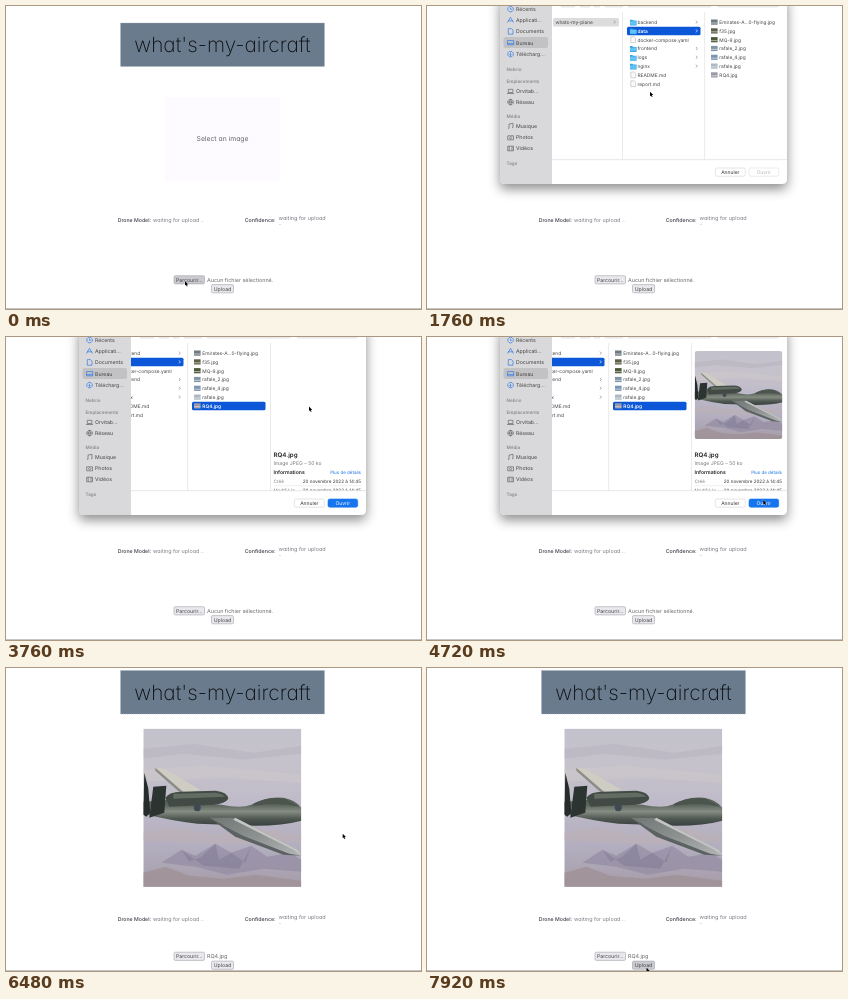
Recreate the animation shown at these times as an HTML page. Size 415x303 px, loop 8000 ms.

```html
<!DOCTYPE html>
<html lang="fr">
<head>
<meta charset="utf-8">
<title>what's-my-aircraft</title>
<style>
  html, body { margin: 0; width: 100%; height: 100%; overflow: hidden; background: #fff; }
  svg { display: block; width: 415px; height: 303px; }
  text { font-family: Inter, "Open Sans", sans-serif; white-space: pre; text-rendering: geometricPrecision; }
  .geo { font-feature-settings: "cv11"; }
  #dialog { filter: drop-shadow(0 5px 6px rgba(0, 0, 0, .45)); }
</style>
</head>
<body>
<svg id="stage" viewBox="0 0 415 303" xmlns="http://www.w3.org/2000/svg"></svg>
<script>
const LOOP = 8000;
const BLUE = '#0b57d8';

const text = (x, y, str, size, fill = '#444', extra = '') =>
  `<text x="${x}" y="${y}" font-size="${size}" fill="${fill}" ${extra}>${str}</text>`;
const rect = (x, y, w, h, fill, extra = '') =>
  `<rect x="${x}" y="${y}" width="${w}" height="${h}" fill="${fill}" ${extra}/>`;
const path = (d, fill, extra = '') => `<path d="${d}" fill="${fill}" ${extra}/>`;
const mid = 'text-anchor="middle"';
const end = 'text-anchor="end"';
const bold = 'font-weight="600"';
const line = (d, color = '#777') => path(d, 'none', `stroke="${color}" stroke-width=".7"`);
const stops = (...colors) => colors.map((c, i) =>
  `<stop offset="${i / (colors.length - 1)}" stop-color="${c}"/>`).join('');

// Aerial scene, 158 x 158
const scene = `
  <linearGradient id="haze" x2="0" y2="1">${stops('#c3c2cc', '#c6c2cb', '#bdb9c8', '#b2aebf', '#a69ca8')}</linearGradient>
  <linearGradient id="hull" x2="0" y2="1">${stops('#5a645a', '#59635a', '#858c82', '#4f5852', '#39413f')}</linearGradient>
  <linearGradient id="wing" x2="1" y2="1">${stops('#6f7674', '#8d9291', '#b4b6b6')}</linearGradient>
  <symbol id="scene" viewBox="0 0 158 158">
    ${rect(0, 0, 158, 158, 'url(#haze)')}
    ${path('M0 20L50 15 110 24 158 17V25L100 31 40 25 0 30Z', '#b8b4bf', 'opacity=".5"')}
    ${path('M0 41L60 37 158 46V54L80 49 0 53Z', '#cfc9cc', 'opacity=".5"')}
    ${path('M0 104L30 98 70 106 110 99 158 106V113L90 116 0 112Z', '#bcb1b6', 'opacity=".6"')}
    ${path('M18 134L38 121 52 127 72 115 88 124 108 117 124 128 146 124 158 131V143L120 140 84 146 52 138Z', '#8f87a0', 'opacity=".6"')}
    ${path('M0 144L22 138 46 147 80 150 112 146 158 152V158H0Z', '#9f9196', 'opacity=".8"')}
    ${path('M38 121L46 133 58 128 72 115 76 131 88 124 102 134 108 117 96 140 60 137Z', '#77708c', 'opacity=".4"')}
    ${path('M12 39L21 40 57 61 42 65Z', '#cfcdc3')}
    ${path('M12 39L42 65 38 65 12 42Z', '#8b8d86')}
    ${path('M0 73L26 71 78 76Q98 80 108 76 124 67 140 69 152 71 158 79V92Q140 97 112 97L54 95Q28 92 0 85Z', 'url(#hull)')}
    ${path('M22 69Q26 63 38 63L72 62Q84 63 85 70 82 75 70 76L26 78Z', '#414a44')}
    ${path('M30 65L72 64Q80 65 82 68L30 70Z', '#626c62')}
    ${path('M110 75Q126 67 142 70L156 78Q136 73 110 77Z', '#4b554e')}
    ${path('M66 89L92 89 154 121 159 127 146 125 100 107Z', 'url(#wing)')}
    ${path('M92 89L154 121 159 127 150 121 90 91Z', '#c4c5c3')}
    ${path('M66 89L100 107 146 125 158 127 140 126 92 108Z', '#5c6261')}
    ${path('M1 44L5 60 7 84 3 88 0 86Z', '#252c2b')}
    ${path('M10 58L23 57 21 84 6 89Z', '#2c3431')}
    <circle cx="54" cy="79" r="3.5" fill="#3e4953"/>
  </symbol>
  <clipPath id="columns">${rect(125, 0, 235, 153.5, '#fff')}</clipPath>
  <clipPath id="thumb">${rect(363.5, 14, 88, 88, '#fff', 'rx="3"')}</clipPath>`;

const button = (id, x, y, w, label) =>
  rect(x, y, w, 8.2, '#e9e9ed', `id="${id}" rx="1.3" stroke="#a2a2aa" stroke-width=".6"`) +
  text(x + w / 2, y + 6, label, 5.2, '#444', mid);

const page = `
  <g id="head">
    ${rect(114.5, 17, 204, 43.5, '#6a7b8d', 'stroke="#a7b1bc" stroke-width=".6" stroke-dasharray="1 1"')}
    ${text(216.5, 46, "what's-my-aircraft", 20.8, '#0b0d10', mid + ' font-weight="200" class="geo"')}
  </g>
  <g id="empty">
    ${rect(159, 91, 115, 85, '#fdfbff')}
    ${text(216.5, 134.7, 'Select an image', 6.8, '#666', mid + ' class="geo"')}
  </g>
  <use id="picture" href="#scene" x="137.3" y="60.5" width="158" height="158.5"/>
  <g id="info" class="geo">
    ${text(111.7, 216, 'Drone Model:', 5.2, '#3c3c48', 'font-weight="500"')}
    ${text(147, 216, 'waiting for upload ..', 5.4, '#7c7c86')}
    ${text(238.7, 216, 'Confidence:', 5.3, '#3c3c48', 'font-weight="500"')}
    ${text(272.5, 213.6, 'waiting for upload', 5.5, '#7c7c86')}
    ${text(272.5, 219.4, '..', 5.5, '#7c7c86')}
  </g>
  ${rect(0, 302, 415, 1, '#c4c4c6')}
  <g id="form">
    ${button('browse', 168, 269.7, 30.5, 'Parcourir...')}
    <text id="file" x="201" y="275.8" font-size="5.4" fill="#666"></text>
    ${button('upload', 205.5, 278.6, 22, 'Upload')}
  </g>`;

// Sidebar rows: baseline, label, icon outline
const places = [
  [5, 'Récents', 'M83.5 0A2.8 2.8 0 1 0 83.6 0M83.5 1.3V3H85'],
  [16, 'Applicati...', 'M80.5 5.2L83.5 0 86.5 5.2M81 3.5H86'],
  [27.3, 'Documents', 'M81.3 0H84.5L86 1.6V5.6H81.3Z'],
  [38.5, 'Bureau', 'M80.5 .8H86.7V5H80.5ZM80.5 3.8H86.7'],
  [50, 'Télécharg...', 'M83.5 0A2.8 2.8 0 1 0 83.6 0M83.5 1.2V4.3M82.3 3.2L83.5 4.4 84.7 3.2'],
  [87, 'Orvitab...', 'M81.3 1H85.9V4.2H81.3ZM80 5.2H87'],
  [98, 'Réseau', 'M83.5 0A2.8 2.8 0 1 0 83.6 0M80.8 2.8H86.3M83.5 0Q81 2.8 83.5 5.6Q86 2.8 83.5 0'],
  [122, 'Musique', 'M82 5V.8L86 0V4.2M81 5H82M85 4.3H86'],
  [133.3, 'Photos', 'M80.7 1.2H86.5V5.2H80.7ZM83.6 2A1.1 1.1 0 1 0 83.7 2'],
  [144.3, 'Vidéos', 'M80.7 .6H86.5V5.2H80.7ZM82.2 .6V5.2M85 .6V5.2']
];
const groups = [[64.5, 'Nebrio'], [77, 'Emplacements'], [112, 'Média'], [159, 'Tags']];
const sidebar =
  rect(76.5, 31, 44.5, 11, '#c2c2c5', 'rx="2"') +
  places.map(([y, label, icon], i) =>
    `<g transform="translate(0 ${y - 4.7})">${line(icon, i < 5 ? '#2f7ae5' : '#666')}</g>` +
    text(89, y, label, 5.2)).join('') +
  groups.map(([y, label]) => text(79.5, y, label, 4.6, '#8b8b8e', bold)).join('');

const ROW = 8.8;
const rowY = i => 18 + i * ROW;
const chevron = (x, y, color) => line(`M${x} ${y - 3.4}l1.3 1.5 -1.3 1.5`, color);
const folder = (x, y) =>
  path(`M${x} ${y - 4.3}h2.4l.8 .8h3.3v5H${x}Z`, '#35a5e8') +
  rect(x, y - 2.7, 6.5, 3.4, '#62c3f5', 'rx=".4"');
const doc = (x, y) => path(`M${x + .8} ${y - 4.8}h3.4l1.4 1.4v4.4h-4.8Z`, '#fafafa', 'stroke="#aaa" stroke-width=".5"');
const image = (x, y, color) =>
  rect(x, y - 4.5, 6.6, 5.2, color) + rect(x, y - 1.5, 6.6, 1, '#eee', 'opacity=".6"');

const items = ['backend', 'data', 'docker-compose.yaml', 'frontend', 'logs', 'nginx', 'README.md', 'report.md'];
const files = [['Emirates-A...0-flying.jpg', '#6e7b80'], ['f35.jpg', '#5b6047'], ['MQ-9.jpg', '#4c5a3a'],
  ['rafale_2.jpg', '#8195a8'], ['rafale_4.jpg', '#7a96b2'], ['rafale.jpg', '#aeb9c3'], ['RQ4.jpg', '#9c98a5']];

const itemRows = items.map((name, i) => {
  const y = rowY(i), on = name === 'data', dir = !name.includes('.');
  return (on ? rect(200, y - 6, 73.5, 8.4, BLUE, 'rx="1.5"') : '') +
    (dir ? folder : doc)(203, y) +
    text(210.5, y, name, 4.85, on ? '#fff' : '#444', on ? bold : '') +
    (dir ? chevron(269, y, on ? '#fff' : '#888') : '');
}).join('');
const fileRows = files.map(([name, color], i) =>
  image(284, rowY(i), color) + text(292.3, rowY(i), name, 4.85)).join('');

const preview = `
  <g id="preview">
    ${rect(282, rowY(6) - 6, 73.5, 8.4, BLUE, 'rx="1.5"')}
    ${image(284, rowY(6), '#9c98a5')}
    ${text(292.3, rowY(6), 'RQ4.jpg', 4.85, '#fff', bold)}
    ${rect(360, 6, .6, 148, '#dcdcdc')}
    <g id="photo" clip-path="url(#thumb)"><use href="#scene" x="363.5" y="14" width="88" height="88"/></g>
    ${text(363.5, 119.7, 'RQ4.jpg', 6.2, '#222', bold)}
    ${text(363.5, 127.6, 'Image JPEG – 50 ko', 5.1, '#777')}
    ${text(363.5, 137, 'Informations', 5.1, '#222', bold)}
    ${text(451, 137, 'Plus de détails', 4.5, '#1673e6', end)}
    ${text(363.5, 146, 'Créé', 4.6, '#777')}
    ${text(451, 146, '20 novembre 2022 à 14:45', 4.6, '#333', end)}
    ${rect(363.5, 148.6, 88, .5, '#e2e2e2')}
    ${text(363.5, 155.2, 'Modifié le', 4.6, '#777')}
    ${text(451, 155.2, '20 novembre 2022 à 14:45', 4.6, '#333', end)}
  </g>`;

const dialog = `
  <g id="dialog">
    ${path('M73 -10H360V173Q360 178 355 178H78Q73 178 73 173Z', '#fff')}
    ${path('M73 -10H125V178H78Q73 178 73 173Z', '#d9d9db')}
    ${sidebar}
    ${[[134, 14], [153, 10], [167, 6], [178, 18], [201, 83], [291, 60]]
      .map(([x, w]) => rect(x, -3, w, 4, '#f0f0f0', 'rx="1" stroke="#ccc" stroke-width=".5"')).join('')}
    <g clip-path="url(#columns)"><g id="browser">
      ${rect(126, rowY(0) - 6, 66, 8.4, '#dcdcdd', 'rx="1.5"')}
      ${text(128.5, rowY(0), 'whats-my-plane', 4.85)}
      ${chevron(187, rowY(0), '#888')}
      ${rect(195, 6, .6, 148, '#dcdcdc')}
      ${itemRows}
      ${rect(277.5, 6, .6, 148, '#dcdcdc')}
      ${fileRows}
      ${preview}
    </g></g>
    ${rect(125, 153.5, 235, .6, '#d8d8d8')}
    ${rect(288.3, 162, 30, 8.2, '#fff', 'rx="1.8" stroke="#d2d2d2" stroke-width=".6"')}
    ${text(303.3, 168, 'Annuler', 5, '#333', mid)}
    ${rect(322, 162, 29.7, 8.2, '#fff', 'id="open" rx="1.8" stroke="#dedede" stroke-width=".6"')}
    ${text(336.8, 168, 'Ouvrir', 5, '#b5b5b5', mid + ' id="openLabel"')}
  </g>`;

const pointer = `<g id="pointer">${path('M0 0V4.6L1 3.7 1.8 5.4 2.6 5 1.8 3.4H3.3Z', '#000',
  'stroke="#fff" stroke-width=".5" paint-order="stroke"')}</g>`;

document.getElementById('stage').innerHTML = `<defs>${scene}</defs>` + page + dialog + pointer;

const $ = {};
document.querySelectorAll('#stage [id]').forEach(el => { $[el.id] = el; });

// Pointer stops: time, x, y
const route = [
  [0, 179, 275], [1040, 179, 275], [1600, 223, 85.7], [1840, 223, 85.7], [2320, 303, 69.5], [3840, 303, 69.5],
  [4480, 336.3, 163], [5040, 336.3, 163], [5200, 336.7, 165.7], [6720, 336.7, 165.7], [7720, 219.5, 299.5], [LOOP, 219.5, 299.5]
];
const ramp = (t, a, b) => Math.min(1, Math.max(0, (t - a) / (b - a)));
const ease = u => u * u * (3 - 2 * u);
const move = (el, x, y) => el.setAttribute('transform', `translate(${x} ${y})`);
const show = (el, on) => el.setAttribute('visibility', on ? 'visible' : 'hidden');

function pointerAt(t) {
  const i = route.findIndex(p => p[0] > t);
  const [t0, x0, y0] = route[i - 1], [t1, x1, y1] = route[i];
  const u = ease(ramp(t, t0, t1));
  return [x0 + (x1 - x0) * u, y0 + (y1 - y0) * u];
}

function hover(el, x, y) {
  const b = el.getBBox();
  const on = x > b.x && x < b.x + b.width && y > b.y && y < b.y + b.height;
  el.setAttribute('fill', on ? '#cacad1' : '#e9e9ed');
}

function render(t) {
  const loaded = t >= 5840, chosen = t >= 2400;
  const drop = loaded ? 14.5 : 0;
  move($.head, 0, -drop);
  move($.info, 0, loaded ? 37 : 0);
  move($.form, 0, drop);
  show($.empty, !loaded);
  show($.picture, loaded);
  $.file.textContent = loaded ? 'RQ4.jpg' : 'Aucun fichier sélectionné.';

  const fade = ramp(t, 320, 480) * (1 - ramp(t, 5360, 5480));
  $.dialog.style.opacity = fade;
  $.dialog.style.display = fade ? '' : 'none';
  move($.browser, -96 * ease(ramp(t, 2400, 2720)), 0);
  $.preview.style.display = chosen ? '' : 'none';
  $.photo.style.display = t >= 3920 ? '' : 'none';
  $.open.setAttribute('fill', chosen ? '#1674ee' : '#fff');
  $.open.setAttribute('stroke', chosen ? '#1674ee' : '#dedede');
  $.openLabel.setAttribute('fill', chosen ? '#fff' : '#b5b5b5');

  const [x, y] = pointerAt(t);
  move($.pointer, x, y);
  hover($.browse, x, y - drop);
  hover($.upload, x, y - drop);
}

function tick() {
  render(performance.now() % LOOP);
  requestAnimationFrame(tick);
}
tick();
</script>
</body>
</html>
```
